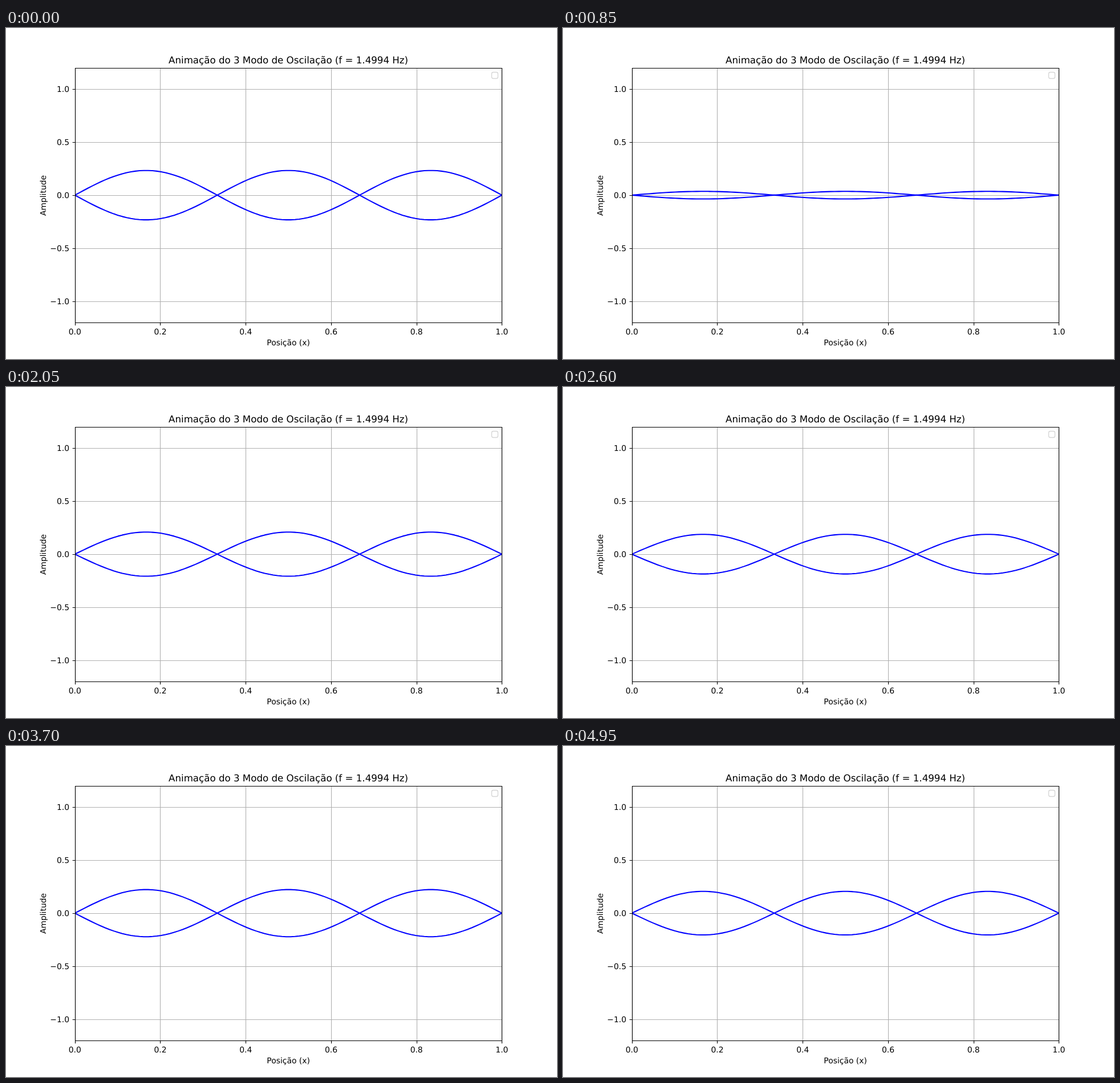
An HTML page that plays this animation: 966 px wide and 580 px high, repeating every 5 s.

```html
<!DOCTYPE html>
<html lang="pt">
<head>
<meta charset="utf-8">
<title>Modo de Oscilação</title>
<style>
  html, body { margin: 0; width: 100%; height: 100%; overflow: hidden; background: #fff; }
  svg { display: block; }
  text { font: 13.889px "DejaVu Sans", sans-serif; text-rendering: geometricPrecision; }
  .title { font-size: 16.667px; }
  .mid { text-anchor: middle; }
  .end { text-anchor: end; }
  path { fill: none; stroke-width: 1.11; }
  #grid { stroke: #b0b0b0; }
  #ticks, #frame { stroke: #000; }
  .wave { stroke: #00f; stroke-width: 2.083; stroke-linejoin: round; }
</style>
</head>
<body>
<svg width="966" height="580" viewBox="0 0 966 580">
  <clipPath id="plot"><rect x="121" y="70" width="749" height="447"/></clipPath>
  <path id="grid"/>
  <path id="ticks"/>
  <g clip-path="url(#plot)">
    <path class="wave"/>
    <path class="wave"/>
  </g>
  <path id="frame" d="M121.5 70.5H869.5V516.5H121.5Z"/>
  <rect x="851.5" y="77.5" width="11" height="11" rx="2.8" fill="#fff" fill-opacity=".8"
        stroke="#ccc" stroke-opacity=".8" stroke-width="1.39"/>
  <g id="labels">
    <text class="title mid" x="495.1" y="62">Animação do 3 Modo de Oscilação (f = 1.4994 Hz)</text>
    <text class="mid" x="495.1" y="556">Posição (x)</text>
    <text class="mid" transform="translate(69.5 293.5) rotate(-90)">Amplitude</text>
  </g>
</svg>
<script>
  const LEFT = 120.75, WIDTH = 748.65, MID = 292.9, UNIT = 186.08;
  const FREQ = 1.4994, PEAK = 0.2325, POINTS = 100;
  const STEP = 50, LOOP = 5000;

  const $ = id => document.getElementById(id);
  const px = x => LEFT + WIDTH * x;
  const py = y => MID - UNIT * y;
  const snap = v => Math.floor(v + 0.5) + 0.5;

  function addLabel(text, x, y, cls) {
    const el = document.createElementNS("http://www.w3.org/2000/svg", "text");
    el.setAttribute("x", x);
    el.setAttribute("y", y);
    el.setAttribute("class", cls);
    el.textContent = text;
    $("labels").append(el);
  }

  let grid = "", ticks = "";
  for (let i = 0; i <= 5; i++) {
    const x = snap(px(i / 5));
    grid += `M${x} 70.5V516.5`;
    ticks += `M${x} 516.5v4.86`;
    addLabel((i / 5).toFixed(1), px(i / 5), 537, "mid");
  }
  for (let i = -2; i <= 2; i++) {
    const y = snap(py(i / 2));
    grid += `M121.5 ${y}H869.5`;
    ticks += `M121.5 ${y}h-4.86`;
    addLabel((i / 2).toFixed(1).replace("-", "\u2212"), 111, y + 4.5, "end");
  }
  $("grid").setAttribute("d", grid);
  $("ticks").setAttribute("d", ticks);

  const waves = document.querySelectorAll(".wave");

  function wavePath(amp) {
    let d = "";
    for (let i = 0; i < POINTS; i++) {
      const x = i / (POINTS - 1);
      const y = amp * Math.sin(3 * Math.PI * x);
      d += (i ? "L" : "M") + px(x).toFixed(2) + " " + py(y).toFixed(2);
    }
    return d;
  }

  function draw(now) {
    const t = Math.floor((now % LOOP) / STEP) * STEP / 1000;
    const amp = PEAK * Math.cos(2 * Math.PI * FREQ * t);
    waves[0].setAttribute("d", wavePath(amp));
    waves[1].setAttribute("d", wavePath(-amp));
  }

  let start;
  function tick(now) {
    start ??= now;
    draw(now - start);
    requestAnimationFrame(tick);
  }
  draw(0);
  requestAnimationFrame(tick);
</script>
</body>
</html>
```
